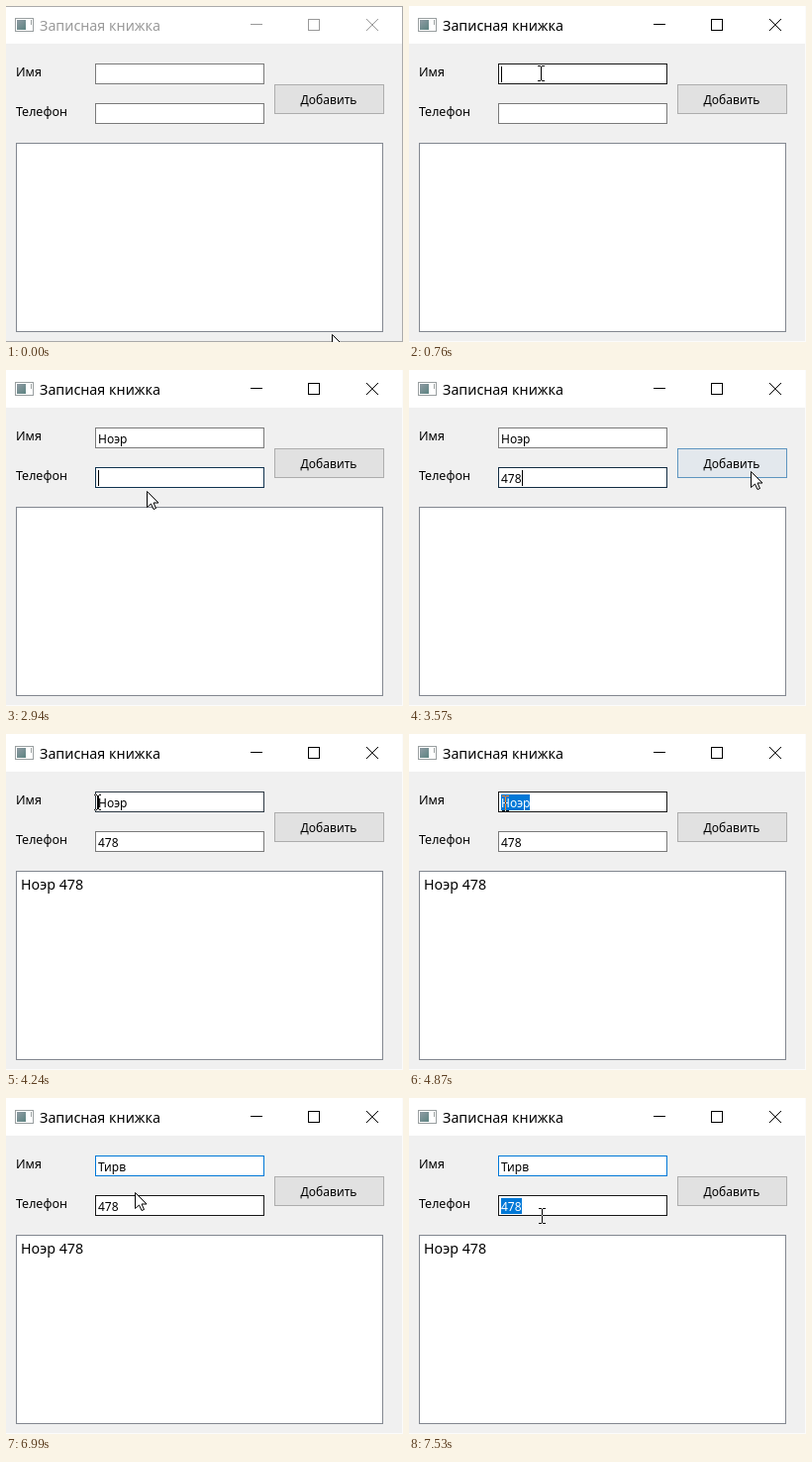
These frames come from a looping animation (401 by 339 pixels, 8000 ms). An HTML page with a canvas:

```html
<!DOCTYPE html>
<html lang="ru">
<head>
<meta charset="utf-8">
<title>Записная книжка</title>
<style>
html, body { margin: 0; width: 100%; height: 100%; overflow: hidden; background: #f0f0f0; }
canvas { display: block; width: 401px; height: 339px; }
</style>
</head>
<body>
<canvas id="stage" width="401" height="339"></canvas>
<script>
const ctx = document.getElementById('stage').getContext('2d');
const LOOP = 8000;
const font = px => `${px}px "Noto Sans", "Open Sans", sans-serif`;
const UI = font(12), LABEL = font(12.5), TITLE = font(14.25);
const FIRST = 'Ноэр', SECOND = 'Тирв', PHONE = '478';
const GREY = [122, 122, 122], DARK = [23, 23, 23], BLUE = [0, 120, 215];

// Pointer moves: start, end, where it comes to rest
const HOME = [329, 331];
const MOVES = [
  [30, 530, 133, 68],    // into the name field
  [2400, 2640, 136, 109], // to the phone field
  [2820, 3060, 148, 134],
  [3240, 3550, 345, 102], // to the button
  [3870, 4230, 92, 69],  // back to the name
  [4250, 4400, 80, 64],  // drag over it
  [4700, 4850, 97, 70],
  [6510, 6740, 122, 46],
  [6740, 7150, 134, 119] // to the phone again
];

const clamp = k => Math.max(0, Math.min(1, k));
const ease = k => k * k * (3 - 2 * k);
const during = (t, from, to) => t >= from && t < to;
// 0 to 1 after "on", back to 0 after "off"
const fade = (t, on, off = Infinity, span = 140) =>
  clamp((t - on) / span) - clamp((t - off) / span);
const mix = (a, b, k) => a.map((v, i) => v + (b[i] - v) * k);
const css = c => `rgb(${c.map(Math.round)})`;

function pointerAt(t) {
  let at = HOME;
  for (const [from, to, ...goal] of MOVES) {
    if (t < from) break;
    at = mix(at, goal, ease(clamp((t - from) / (to - from))));
  }
  return at.map(Math.round);
}

function rect(x, y, w, h, fill) {
  ctx.fillStyle = fill;
  ctx.fillRect(x, y, w, h);
}

function box(x, y, w, h, edge, fill) {
  rect(x, y, w, h, edge);
  rect(x + 1, y + 1, w - 2, h - 2, fill);
}

function text(str, x, y, face = UI, fill = '#000', align = 'left') {
  ctx.font = face;
  ctx.fillStyle = fill;
  ctx.textAlign = align;
  ctx.fillText(str, x, y);
}

function line(points) {
  ctx.beginPath();
  for (const [x, y] of points) ctx.lineTo(x, y);
}

function stroke(colour) {
  ctx.strokeStyle = colour;
  ctx.lineWidth = 1;
  ctx.stroke();
}

// caret: number of letters before it, or -1 for none
function field(y, focus, hover, str, caret, selected) {
  const edge = mix(mix(GREY, BLUE, focus), DARK, hover);
  box(90, y, 171, 21, css(edge), '#fff');
  ctx.font = UI;
  const width = n => Math.round(ctx.measureText(str.slice(0, n)).width);
  if (selected) rect(93, y + 3, width(str.length), 16, css(BLUE));
  text(str, 93, y + 16, UI, selected ? '#fff' : '#000');
  if (caret >= 0) rect(93 + width(caret), y + 3, 1, 16, '#000');
}

function icon() {
  box(9, 12, 19, 14, '#999fa0', '#fff');
  const shade = ctx.createLinearGradient(11, 14, 19, 24);
  shade.addColorStop(0, '#8f9ba3');
  shade.addColorStop(1, '#5f8583');
  rect(11, 14, 9, 10, shade);
  rect(25, 14, 1, 5, '#999fa0');
}

function titleBar(active) {
  const ink = active ? '#000' : '#999';
  rect(0, 0, 401, 38, '#fff');
  icon();
  text('Записная книжка', 34, 25, TITLE, ink);
  rect(247, 18, 12, 1, ink);
  box(305, 13, 12, 12, ink, '#fff');
  for (const d of [-6, 6]) {
    line([[370 - d, 13], [370 + d, 25]]);
    stroke(ink);
  }
}

function arrow(x, y) {
  const shape = [[0, 0], [0, 16], [4, 12.5], [6.5, 18], [9, 17], [6.5, 11.5], [11.5, 11.5]];
  line(shape.map(([dx, dy]) => [x + dx + 0.5, y + dy + 0.5]));
  ctx.closePath();
  ctx.fillStyle = '#fff';
  ctx.fill();
  stroke('#000');
}

// The text cursor inverts what lies under it
function beam(x, y) {
  ctx.globalCompositeOperation = 'difference';
  rect(x, y - 7, 1, 14, '#fff');
  for (const dy of [-8, 7]) {
    rect(x - 3, y + dy, 3, 1, '#fff');
    rect(x + 1, y + dy, 3, 1, '#fff');
  }
  ctx.globalCompositeOperation = 'source-over';
}

function pointer(t) {
  const [x, y] = pointerAt(t);
  const inside = x >= 90 && x < 261 && (during(y, 58, 79) || during(y, 98, 120));
  const dragging = during(t, 4240, 4870);
  inside || dragging ? beam(x, y) : arrow(x, y);
}

const typed = (str, times, t) => str.slice(0, times.filter(at => t >= at).length);

function nameField(t) {
  const str = t < 5400
    ? typed(FIRST, [1310, 1540, 1620, 1770], t)
    : typed(SECOND, [5400, 5480, 5650, 5880], t);
  const blink = during(t, 530, 1160) || during(t, 1310, 2400) || during(t, 5400, 6510);
  const caret = blink ? str.length : during(t, 4200, 4560) ? 0 : -1;
  const focus = fade(t, 530, 2680) + fade(t, 4200);
  const hover = fade(t, 380, 2450) + fade(t, 4150, 6590);
  field(58, focus, hover, str, caret, during(t, 4560, 5400));
}

function phoneField(t) {
  const str = typed(PHONE, [3240, 3320, 3470], t);
  const again = t >= 7142;
  const caret = during(t, 2700, 3790) || (again && t < 7530) ? str.length : -1;
  const hover = fade(t, 2560, 2900) + fade(t, 3280, 3540) + fade(t, 6850);
  field(98, fade(t, 2680, 3790), hover, str, caret, again);
}

function button(t) {
  const hover = fade(t, 3480, 4010, 200), press = fade(t, 3720, 3800, 60);
  const edge = mix(mix([173, 173, 173], BLUE, hover), [0, 84, 153], press);
  const fill = mix(mix([225, 225, 225], [229, 241, 251], hover), [204, 228, 247], press);
  box(271, 79, 111, 30, css(edge), css(fill));
  text('Добавить', 326, 99, UI, '#000', 'center');
}

function draw(t) {
  const active = t >= 530;
  rect(0, 0, 401, 339, '#f0f0f0');
  titleBar(active);
  text('Имя', 10, 71, LABEL);
  text('Телефон', 10, 111, LABEL);
  nameField(t);
  phoneField(t);
  button(t);

  box(10, 138, 371, 191, '#828790', '#fff');
  if (t >= 3800) text(FIRST + ' ' + PHONE, 15, 157, TITLE);

  const rim = active ? '#fbfbfb' : '#aaa';
  if (!active) rect(0, 0, 401, 1, rim);
  rect(0, 338, 401, 1, rim);
  rect(400, 0, 1, 339, rim);
  pointer(t);
}

const start = performance.now();
function tick() {
  draw((performance.now() - start) % LOOP);
  requestAnimationFrame(tick);
}
tick();
</script>
</body>
</html>
```
